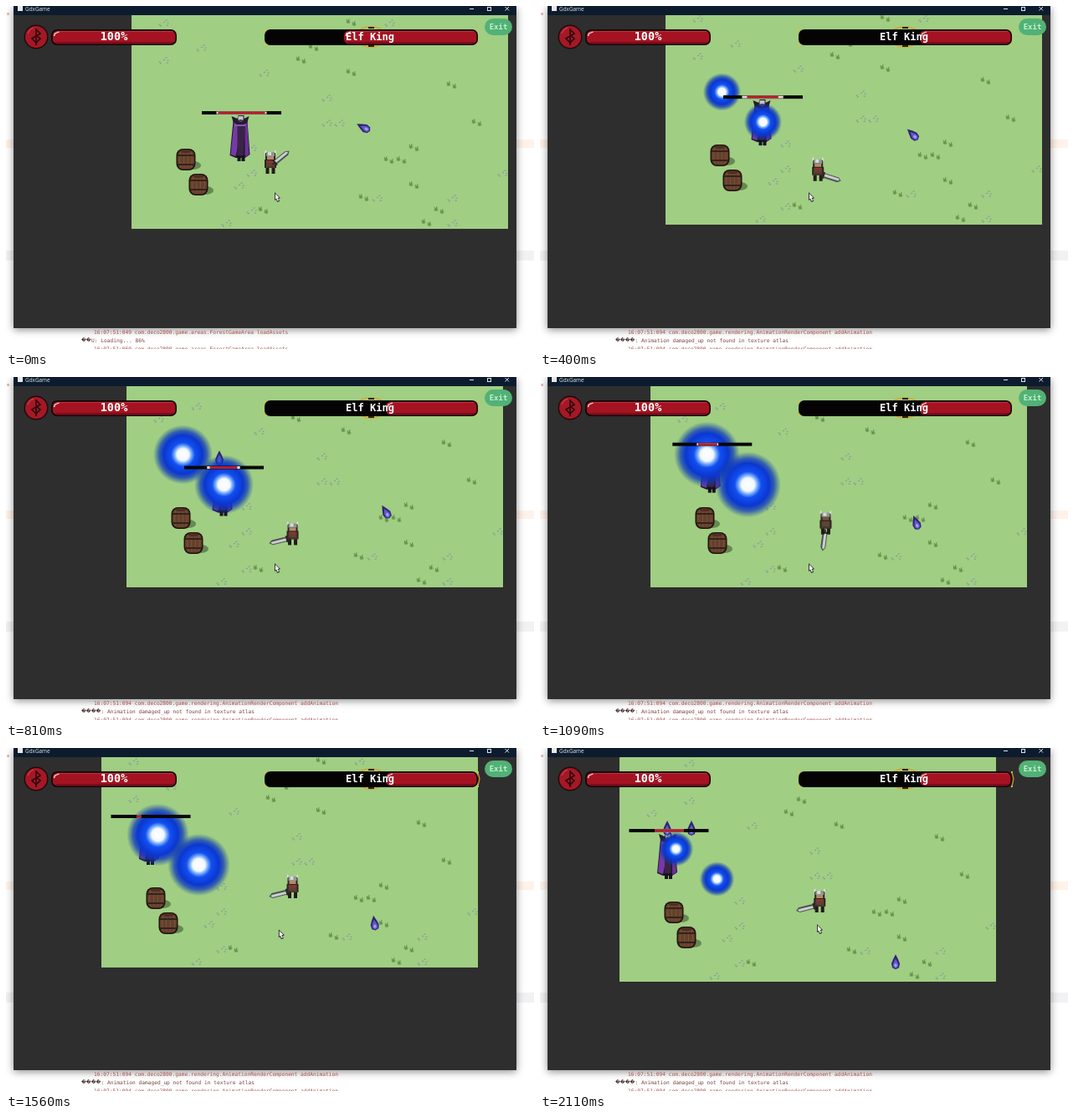
An HTML page with a canvas that plays this animation: 631x411 px, repeating every 2.18 s.

```html
<!DOCTYPE html>
<html lang="en">
<head>
<meta charset="utf-8">
<title>GdxGame</title>
<style>
html, body { margin: 0; width: 100%; height: 100%; overflow: hidden; background: #fff; }
canvas { display: block; width: 631px; height: 411px; }
</style>
</head>
<body>
<canvas id="stage" width="631" height="411"></canvas>
<script>
const c = document.getElementById('stage').getContext('2d');
const LOOP = 2180, STEP = 68.1, LEAD = 8, LAST = 31, TILE = 15;
const MONO = '"DejaVu Sans Mono", monospace';

// Map decoration in tiles: column, row counted from the bottom
const TUFTS = [[17, 16], [14, 14], [13, 13], [17, 12], [25, 11], [27, 8], [22, 6], [20, 5], [21, 5],
  [22, 3], [24, 1], [23, 0], [18, 2], [10, 1]];
const PEBBLES = [[10, 12], [16, 8], [7, 0], [19, 2], [29, 4], [20, 16], [9, 1], [8, 3]];
const PEBBLE_PAIRS = [[2, 16, 3], [5, 17, 3], [15, 10, 2], [9, 6, 2], [25, 2, 2]];
for (const [col, row, gap] of PEBBLE_PAIRS) PEBBLES.push([col, row], [col, row - gap]);

const spent = (t, from, to) => Math.min(Math.max(t, from), to) - from;
const ramp = (t, from, to) => spent(t, from, to) / (to - from);
const smooth = k => k * k * (3 - 2 * k);

// Motion rules; all but the camera are in map coordinates, origin at its bottom-left corner
const camera = t => [
  150 - .045 * (spent(t, 680, 1200) + spent(t, 1280, 1980)),
  267.3 + .0395 * (spent(t, 1280, 1980) - spent(t, 280, 670))
].map(Math.round);
const playerAt = t => [
  166 + .04 * Math.min(t, 1830),
  -80 + 17 * ramp(t, 0, 500) - 34 * smooth(ramp(t, 700, 1560))
];
const bossAt = t => [
  131.5 - 15 * ramp(t, 0, 400) - 57.5 * ramp(t, 900, 1150),
  -139 - 14 * ramp(t, 0, 400) + 9.5 * ramp(t, 400, 810) - 37.5 * ramp(t, 900, 1150)
];
const boltAt = t => {
  const k = t / 2110, rest = Math.max(0, 1 - k);
  return [278 + 52 * (1 - rest ** 2), -121 + 98.5 * k ** 1.2, -1.08 * rest ** 1.5];
};
const orbSize = t => 40 * Math.sin(Math.PI * ramp(t, 60, 2410)) ** .7;
const facesAway = t => t > 1020 && t < 1430;
const swordAngle = t => t < 200 ? -.68 : t < 600 ? .31 : facesAway(t) ? 1.7 : 2.9;

function rect(color, x, y, w, h) {
  c.fillStyle = color;
  c.fillRect(x, y, w, h);
}
function trace(pts) {
  c.beginPath();
  for (let i = 0; i < pts.length; i += 2) c.lineTo(pts[i], pts[i + 1]);
}
function poly(color, ...pts) {
  c.fillStyle = color;
  trace(pts);
  c.fill();
}
function line(color, width, ...pts) {
  c.strokeStyle = color;
  c.lineWidth = width;
  trace(pts);
  c.stroke();
}
function oval(color, x, y, rx, ry = rx) {
  c.fillStyle = color;
  c.beginPath();
  c.ellipse(x, y, rx, ry, 0, 0, 7);
  c.fill();
}
function pill(color, x, y, w, h, r) {
  c.fillStyle = color;
  c.beginPath();
  c.roundRect(x, y, w, h, r);
  c.fill();
}
function text(str, x, y, font, color, align = 'left') {
  c.font = font;
  c.fillStyle = color;
  c.textAlign = align;
  c.textBaseline = 'middle';
  c.fillText(str, x, y);
}
function placed(x, y, draw, turn = 0) {
  c.save();
  c.translate(x, y);
  c.rotate(turn);
  draw();
  c.restore();
}

function desktop(t) {
  rect('#fff', 0, 0, 631, 411);
  rect('#fff2e9', 0, 160, 631, 10);
  rect('#f2f2f4', 0, 293, 631, 12);
  text('≡', 1, 10, '5px ' + MONO, '#b5524a');
  c.save();
  c.shadowColor = 'rgba(0,0,0,.45)';
  c.shadowBlur = 9;
  c.shadowOffsetY = 2;
  rect('#2e2e2e', 9, 0, 601, 386);
  c.restore();
  log(t);
}
function log(t) {
  const font = '6.22px ' + MONO, red = '#a5504a', early = t < 180;
  const call = early
    ? '16:07:51:049 com.deco2800.game.areas.ForestGameArea loadAssets'
    : '16:07:51:094 com.deco2800.game.rendering.AnimationRenderComponent addAnimation';
  text(call, 105, 391, font, red);
  text(call.replace(':049', ':060'), 105, 411, font, red);
  text('\ufffd'.repeat(early ? 2 : 4), 90, 401, '5.7px "DejaVu Sans", sans-serif', '#4a3030');
  text(early ? 'U: Loading... 86%' : ': Animation damaged_up not found in texture atlas', early ? 102 : 113.5, 401, font, '#7d4340');
}
function titleBar() {
  rect('#0c1c2e', 9, 0, 601, 11);
  rect('#e8e8e8', 14, 0, 6, 6);
  text('GdxGame', 23, 4, '6.4px "Open Sans", sans-serif', '#e4e8ec');
  line('#dfe3e8', 1, 554, 3.5, 559, 3.5);
  c.strokeRect(575.5, 1.5, 4, 4);
  line('#dfe3e8', 1, 596.5, 1, 601, 5.5);
  line('#dfe3e8', 1, 601, 1, 596.5, 5.5);
}

function tuft(x, y) {
  for (const side of [-1, 1]) placed(x + 3.5 * side, y + 1.5 * side, () => {
    oval('#75a55a', 0, 1, 2.5, 2);
    line('#618f4b', 1, -2, -2, 0, 2, 1, -3);
  });
}
function pebbles(x, y) {
  for (let i = 0; i < 6; i++) {
    const dx = 5 * Math.cos(i * 2.4), dy = 3.5 * Math.sin(i * 1.7);
    rect('#86a18c', x + dx, y + dy, 2, 1.5);
    rect('#b4c9b0', x + dx, y + dy - 1, 1, 1);
  }
}
function barrel(x, y) {
  oval('rgba(62,92,48,.6)', x + 9, y + 7, 9, 5);
  placed(x, y, () => {
    pill('#20130d', -11.5, -13, 23, 26, 8);
    pill('#64402c', -10, -11.5, 20, 23, 7);
    for (let i = -6; i <= 6; i += 4) line('#7d5138', 1, i, -10, i * 1.25, 0, i, 10);
    oval('#4c2f21', 0, -10, 6.5, 2);
    for (const top of [-6, 5]) rect('#33231c', -10, top, 20, 2);
  });
}
function boss(x, y) {
  placed(x, y, () => {
    poly('#21182d', -9, 10, 8, 10, 11, 50, 5, 54, -6, 54, -13, 51);
    poly('#7639a6', -8, 11, -3, 11, -3, 38, -6, 52, -12, 50);
    poly('#6a2f98', 5, 13, 8, 12, 10, 50, 5, 53);
    poly('#392447', -4, 14, 5, 14, 3, 52, -4, 52);
    rect('#8b55b5', -7, 13, 13, 3);
    for (const foot of [-4, 1]) rect('#17121d', foot, 51, 4, 7);
    poly('#241c30', -11, 4, -4, 7, -3, 3, 4, 3, 4, 7, 10, 4, 8, 11, 4, 14, -5, 14, -9, 11);
    rect('#c7c2c9', -3, 4, 6, 5);
    rect('#55405f', -2, 8, 4, 3);
  });
}
function bossBar(x, y, t) {
  const left = x - 28 + 11 * ramp(t, 0, 500);
  const right = x + (t > 1690 ? 18 : 28 - 12 * ramp(t, 0, 500) - 29 * ramp(t, 810, 1600));
  const edge = 2 + 4 * ramp(t, 0, 400) - 6 * ramp(t, 400, 1300);
  rect('#070707', x - 47.5, y - 2, 95, 4);
  rect('#e4dada', left - edge, y - 1.5, right - left + 2 * edge, 3);
  rect('#b51f2a', left, y - 1.5, right - left, 3);
}
function orb(x, y, r) {
  const g = c.createRadialGradient(x, y, 0, x, y, r);
  const stops = [[0, '#fff'], [.2, '#f2f8ff'], [.3, '#6aa3fb'], [.4, '#124ff0'], [.65, '#0a37d0'],
    [.8, 'rgba(12,54,190,.72)'], [1, 'rgba(20,70,160,0)']];
  for (const stop of stops) g.addColorStop(...stop);
  oval(g, x, y, r);
}
function flame(x, y, turn = 0) {
  placed(x, y, () => {
    poly('#2f2472', 0, -10, 3, -4, 5, 1, 4, 6, 0, 8, -4, 6, -5, 1, -3, -4);
    poly('#6259cc', 0, -5, 3, 1, 3, 5, 0, 7, -3, 5, -3, 1);
    oval('#a59de8', 0, 3, 1.6, 2.2);
  }, turn);
}
function sword(angle) {
  placed(0, 5, () => {
    poly('#4e5355', 6, -3, 25, -3, 29, 0, 25, 3, 6, 3);
    poly('#c9cfcd', 8, -2, 25, -2, 27, 0, 25, 1, 8, 1);
    rect('#3c2d28', 3, -1, 4, 2);
    rect('#2c2624', 6, -4, 2, 8);
  }, angle);
}
function player(x, y, t) {
  const back = facesAway(t);
  placed(x, y, () => {
    if (back) sword(swordAngle(t));
    for (const side of [-1, 1]) {
      rect('#231b19', side * 3.5 - 2, 6, 4, 8);
      poly('#e6e5da', side * 6, -15, side * 7, -10, side * 4, -8, side * 4, -11);
    }
    rect('#2d2220', -7, -3, 14, 10);
    rect(back ? '#5d4434' : '#5f4035', -5, -2, 10, 7);
    if (!back) rect('#8c332d', -4, -2, 8, 3);
    rect('#49372e', -6, 5, 12, 2);
    rect('#2b2422', -6, -11, 12, 9);
    rect(back ? '#79543b' : '#b08a6b', -4, -7, 8, 4);
    rect('#8f9694', -5, -12, 10, 5);
    rect('#d6dbd6', -3, -12, 4, 4);
    if (!back) sword(swordAngle(t));
  });
}

function world(t) {
  c.save();
  c.beginPath();
  c.rect(9, 11, 601, 375);
  c.clip();
  c.translate(...camera(t));
  rect('#a0ce83', 0, -300, 450, 300);
  const scatter = (tiles, draw) => {
    for (const [col, row] of tiles) draw((col + .5) * TILE, -(row + .5) * TILE);
  };
  scatter(PEBBLES, pebbles);
  scatter(TUFTS, tuft);
  barrel(65, -83);
  barrel(80, -53);

  const [bx, by] = bossAt(t);
  boss(bx - 1, by);
  if (t > 600 && t < 900) flame(111, -154);
  if (t > 1690) {
    const drift = ramp(t, 1840, 2110);
    flame(63 - 6 * drift, -183);
    flame(84 + 2 * drift, -183);
  }
  if (t > 120) {
    orb(67.5, -159, orbSize(t));
    orb(116.5, -123, orbSize(t));
  }
  bossBar(bx, by, t);
  player(...playerAt(t), t);
  flame(...boltAt(t));
  c.restore();
}

function bar(x, w, from) {
  pill('#100606', x, 28, w, 19, 7);
  c.save();
  c.beginPath();
  c.roundRect(x + 1.5, 29.5, w - 3, 16, 6);
  c.clip();
  rect('#050303', x, 28, w, 19);
  pill('#a51322', from, 29.5, x + w - from, 16, 6);
  rect('#7c0d1a', from + 4, 43, x + w - from, 3);
  rect('#c0303b', from + 6, 30, x + w - from, 1);
  c.restore();
  line('#f5dcdc', 1.3, from + 2, 36, from + 3, 33, from + 8, 31);
}
function hud(t) {
  oval('#23090b', 36, 37, 14.5);
  oval('#a51826', 36, 37, 13);
  line('#d44b53', 1, 26, 33, 29, 28, 33, 26);
  line('#2b080b', 1.6, 36, 27, 36, 47);
  line('#2b080b', 1.6, 36, 28, 41, 33, 31, 39, 36, 44, 41, 39, 36, 35);
  bar(54, 150, 55.5);
  text('100%', 129, 37.5, 'bold 13.5px ' + MONO, '#fff', 'center');

  c.strokeStyle = '#d2a52c';
  c.lineWidth = 1.5;
  c.beginPath();
  c.ellipse(436, 37, 19, 12, 0, 0, 7);
  c.stroke();
  for (const y of [25, 47]) rect('#2c2410', 433, y, 7, 2);
  bar(309, 255, t < 130 ? 404 : 454);
  for (const x of [308, 563]) for (const y of [28, 45]) rect('#dcc23a', x, y, 2, 2);
  if (t > 1430) line('#c9a02e', 1.2, 564, 29, 566, 37, 564, 46);
  text('Elf King', 435, 37.5, 'bold 12px ' + MONO, '#fff', 'center');

  pill('#52b176', 572, 15, 33, 20, 10);
  text('Exit', 588.5, 25.5, 'bold 9px ' + MONO, '#c4f3cb', 'center');
}
function mouse(t) {
  const k = ramp(t, 1360, 1780);
  placed(322 + 10 * k, 224 - 12 * k, () => {
    poly('#333', -1, -1, 6, 6, 4, 7, 5, 10, 2, 11, 1, 8, -1, 9);
    poly('#fff', 0, 1, 4.5, 5.5, 2.6, 6, 4, 9, 2.5, 9.6, 1.4, 6.6, 0, 7.5);
  });
}

function draw(now) {
  const n = Math.min(LAST, Math.floor((now % LOOP + LEAD) / STEP));
  const t = Math.max(0, n * STEP - LEAD + 4);
  desktop(t);
  world(t);
  titleBar();
  hud(t);
  mouse(t);
}

const start = performance.now();
function tick() {
  draw(performance.now() - start);
  requestAnimationFrame(tick);
}
tick();
</script>
</body>
</html>
```
